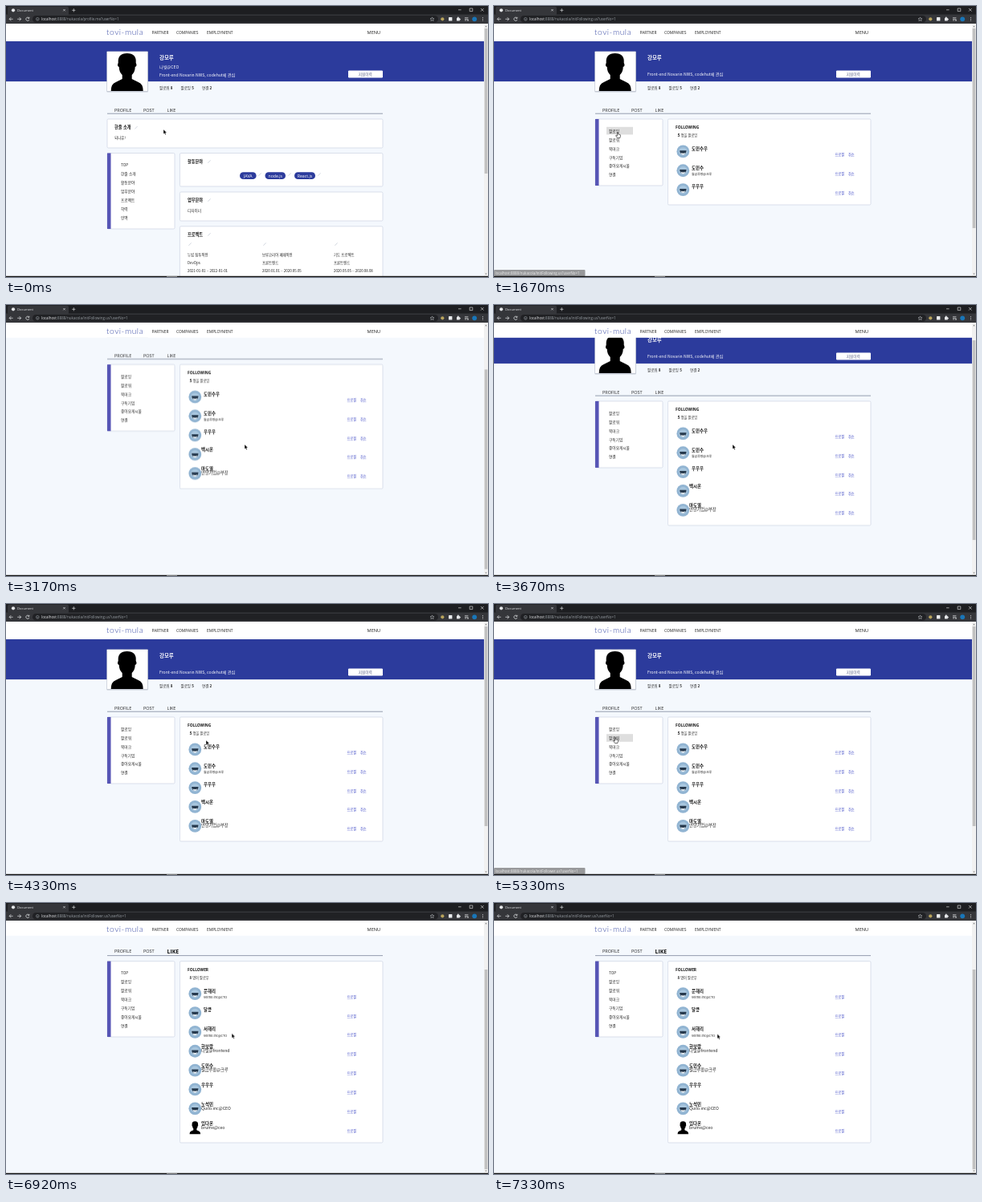
Write an HTML page that moves like this. It is 600 px wide and 338 px high and loops after 8 s.

```html
<!DOCTYPE html>
<html lang="ko">
<head>
<meta charset="utf-8">
<title>Document</title>
<style>
html, body { margin: 0; width: 100%; height: 100%; overflow: hidden; background: #f4f8fd; }
svg { display: block; width: 600px; height: 338px; }
text { font-family: "Noto Sans CJK KR", "Noto Sans CJK", "Noto Sans", sans-serif; fill: #222; white-space: pre; }
.ui text { font-family: "Open Sans", "Noto Sans", sans-serif; }
text.b { font-weight: 700; fill: #111; }
.latin { font-family: "Open Sans", "Noto Sans", sans-serif !important; }
.card { fill: #fff; stroke: #ccd3e2; stroke-width: .7; }
.doc { animation: scroll 8s linear infinite; }
.thumb { animation: thumb 8s linear infinite; }
.cursor { animation: move 8s linear infinite; }

@keyframes scroll {
  0%, 31.25% { transform: translateY(0); }
  32.25% { transform: translateY(-1px); }
  35.4%, 39.2% { transform: translateY(-70px); }
  45.9% { transform: translateY(-21px); }
  47.9%, 77.2% { transform: translateY(0); }
  79.2% { transform: translateY(-57px); }
  82.3%, 100% { transform: translateY(-70px); }
}
@keyframes thumb {
  0%, 31.25% { transform: translateY(0); }
  32.25% { transform: translateY(.8px); }
  35.4%, 39.2% { transform: translateY(55px); }
  45.9% { transform: translateY(16px); }
  47.9%, 77.2% { transform: translateY(0); }
  79.2% { transform: translateY(45px); }
  82.3%, 100% { transform: translateY(55px); }
}
@keyframes move {
  0%, .9% { transform: translate(196px, 154px); }
  8.4%, 12% { transform: translate(207px, 129px); }
  18.8% { transform: translate(155px, 155px); }
  20.8%, 25.5% { transform: translate(154px, 157px); }
  28.5% { transform: translate(225px, 168px); }
  31.25%, 51.5% { transform: translate(297px, 174px); }
  54.1% { transform: translate(250px, 170px); }
  58%, 70.5% { transform: translate(151px, 166px); }
  75% { transform: translate(264px, 160px); }
  77.1%, 85% { transform: translate(282px, 162.5px); }
  91.6%, 100% { transform: translate(278px, 163.5px); }
}
</style>
</head>
<body>
<svg id="stage" viewBox="0 0 600 338" xmlns="http://www.w3.org/2000/svg"></svg>
<script>
const LOOP = 8000, BLUE = '#2c3b9c';
let css = '', count = 0;

// Text placed by its left edge and vertical middle
const txt = (x, y, s, size = 4.7, attr = '') =>
  `<text x="${x}" y="${y + size * .36}" font-size="${size}" ${attr}>${s}</text>`;
const bold = (x, y, s, size) => txt(x, y, s, size, 'class="b"');
const box = (x, y, w, h, fill, r = 0) =>
  `<rect x="${x}" y="${y}" width="${w}" height="${h}" rx="${r}" fill="${fill}"/>`;
const card = (x, y, r, b) =>
  `<rect class="card" x="${x}" y="${y}" width="${r - x}" height="${b - y}" rx="1.5"/>`;
const line = (d, color, w = .8) =>
  `<path d="${d}" fill="none" stroke="${color}" stroke-width="${w}"/>`;

// Shows content only in the given spans of the loop, in ms
function during(spans, body) {
  const name = 'show' + count++;
  const pct = t => +(t / LOOP * 100).toFixed(3);
  let frames = spans[0][0] > 0 ? '0%{opacity:0}' : '';
  for (const [a, b] of spans)
    frames += `${pct(a)}%{opacity:1}` + (b < LOOP ? `${pct(b)}%{opacity:0}` : '100%{opacity:1}');
  css += `@keyframes ${name}{${frames}}.${name}{opacity:0;animation:${name} 8s step-end infinite}`;
  return `<g class="${name}">${body}</g>`;
}

const bust = (x, y, k) => `<path transform="translate(${x} ${y}) scale(${k})" fill="#000"
  d="M-20 24Q-20 15-14 13L-6 9V4Q-10 0-10-6Q-13-7-11-11Q-12-23 0-23Q12-23 11-11Q13-7 10-6Q10 0 6 4V9L14 13Q20 15 20 24Z"/>`;

const face = y => `<g transform="translate(235.3 ${y})"><circle r="7.9" fill="#91b4d2"/>
  <ellipse rx="5.4" ry="5" fill="#a8c6de"/><path d="M-4.2-1.2H4.2Q4 3.4 0 3.4T-4.2-1.2Z" fill="#26394d"/>
  <path d="M-2.8 1.5Q0 3 2.8 1.5Q2 4 0 4T-2.8 1.5Z" fill="#eef3f7"/></g>`;

function tabs(active) {
  const y = active ? 135.6 : 134.2;
  return txt(135, 130.4, 'PROFILE', 5.5, 'class="latin"') + txt(171, 130.4, 'POST', 5.5, 'class="latin"') +
    (active ? txt(200.6, 131, 'LIKE', 6.8, 'class="b latin"') : txt(200.6, 130.4, 'LIKE', 5.5, 'class="latin"')) +
    line(`M126 ${y}H469`, '#8b93a8', .9);
}

const sidebar = (top, bottom, items, hover = '') =>
  card(126, top, 210, bottom) + box(126, top, 4.5, bottom - top, '#5655b5') + hover +
  items.map((s, i) => txt(143, top + 15.2 + i * 10.9, s)).join('');

const hoverAt = y => box(140, y - 4.8, 33, 9.6, '#dedede');

// One person: wide rows put the name further left and larger notes
function person(y, [name, note = '', kind = ''], cancel) {
  const wide = kind.includes('w'), x = wide ? 243 : 246;
  return (kind.includes('p') ? bust(235.3, y, .34) : face(y)) +
    bold(x, y - (wide ? 5.4 : 3.6), name, 5.4) +
    txt(x, y + (wide ? -.5 : 4.2), note, wide ? 5.2 : 3.9) +
    txt(424.5, y + 4, '프로필', 4.2, 'style="fill:#3b46c4"') +
    (cancel ? txt(441, y + 4, '취소', 4.2, 'style="fill:#3b46c4"') : '');
}
const people = (list, top, from, cancel) =>
  list.map((p, i) => person(top + (i + from) * 23.85, p, cancel)).join('');

const pencil = (x, y) => line(`M${x - 1.6} ${y + 1.8}L${x + 1.6} ${y - 1.6}`, '#d3d8e0', 1);
const title = (x, y, s) => bold(x, y, s, 5.2) + pencil(x + 27, y);
const pill = (x, w, s) => box(x, 207.3, w, 8.8, BLUE, 4.4) +
  txt(x + w / 2, 211.7, s, 5.2, 'text-anchor="middle" class="latin" style="fill:#fff"');
const project = (x, rows) => pencil(x + 3, 297) +
  rows.map((s, i) => txt(x, 310 + i * 10.4, s, 4.4)).join('');

const white = 'style="fill:#fff"';
const hero = box(0, 22, 600, 22, '#fff') + box(0, 44, 600, 50, BLUE) +
  box(0, 94, 600, .8, '#dbe2ee') +
  box(125.3, 56.6, 51.6, 51, '#c4c9d4', 1) + box(126, 57, 50, 49, '#fff') + bust(150.7, 82, 1) +
  txt(191, 65, '강모루', 6.4, 'font-weight="700" style="fill:#fff"') +
  box(426, 80.4, 43, 9, '#fff', 1.2) + txt(438.8, 85, '지원이력', 4.6, 'style="fill:#5d6488"') +
  [['팔로워', 8, 191], ['팔로잉', 5, 217.5], ['연결', 2, 244]].map(([s, n, x]) =>
    txt(x, 102, `${s} <tspan font-weight="700">${n}</tspan>`, 4.5)).join('');
const about = y => txt(191, y, 'Front-end Novarin NWS, codehut에 관심', 5.1, white);

const profile = txt(191, 75.8, '나빛@CEO', 5.1, white) + about(86) + tabs(false) +
  card(126, 141, 469, 177) + title(135, 151.6, '한줄 소개') + txt(135, 164.4, '되나유!', 4.5) +
  sidebar(183.5, 278, ['TOP', '한줄 소개', '활동분야', '업무분야', '프로젝트', '학력', '인맥']) +
  card(216.4, 183.5, 469, 225) + title(226, 194, '활동분야') +
  pill(291, 20.6, 'JAVA') + pill(322.5, 25.5, 'node.js') + pill(359, 26, 'React.js') +
  [316, 353, 390].map(x => pencil(x, 210)).join('') +
  card(216.4, 232, 469, 268) + title(226, 242, '업무분야') + txt(226, 255.4, '디자이너', 4.6) +
  card(216.4, 274.8, 469, 350) + title(226, 284.8, '프로젝트') +
  project(226, ['누빔 침투작전', 'DevOps', '2021-01-01 ~ 2022-01-01']) +
  project(319, ['보루코리아 폐쇄작전', '프론트엔드', '2020.01.01 ~ 2020.05.05']) +
  project(408, ['기도 프로젝트', '프론트엔드', '2020.05.05 ~ 2020.08.08']);

const menu = ['팔로잉', '팔로워', '북마크', '구독기업', '좋아요게시물', '연결'];

const following = about(85) + tabs(false) +
  sidebar(141, 224, menu, during([[1480, 2150]], hoverAt(155.6)) + during([[4560, 5600]], hoverAt(167))) +
  during([[0, 2720]], card(216.4, 141, 469, 248)) +
  during([[2720, LOOP]], card(216.4, 141, 469, 296) +
    people([['백시온', '', 'w'], ['마도열', '안냥기업@부장', 'w']], 181.4, 3, true)) +
  txt(226, 151.6, 'FOLLOWING', 4.8, 'class="b latin"') +
  txt(228.5, 161.6, '<tspan font-weight="700" font-size="5.2">5</tspan> 명을 팔로잉', 4.2) +
  people([['도민수우'], ['도민수', '월급루팡@크루'], ['우우우']], 181.4, 0, true);

const follower = about(85) + tabs(true) +
  sidebar(142.6, 237, ['TOP', ...menu]) +
  during([[0, 6360]], card(216.4, 142.6, 469, 250)) +
  during([[6360, LOOP]], card(216.4, 142.6, 469, 369) +
    people([['한보람', '나빛@frontend', 'w'], ['도민수', '월급루팡@크루', 'w'], ['우우우', '', 'w'],
      ['노석민', 'Quilo.inc@CEO', 'w'], ['임다온', 'brume@ceo', 'wp']], 183.2, 3)) +
  txt(226, 153, 'FOLLOWER', 4.8, 'class="b latin"') +
  txt(228.5, 163.2, '<tspan font-weight="700">8</tspan> 명이 팔로우', 4.2) +
  people([['문해리', 'Velmo.inc@CTO'], ['달콩'], ['서해리', 'Velmo.inc@CTO']], 183.2, 0);

const FIRST = [[0, 890]], SECOND = [[890, 5600]], THIRD = [[5600, LOOP]];

const header = box(0, 22, 600, 18.8, '#fff') +
  txt(125, 32.6, 'tovi-mula', 10.2, 'font-weight="300" style="font-family:Lato,sans-serif;fill:#3c4da6;letter-spacing:.55px"') +
  txt(181.5, 33.2, 'PARTNER', 4.9) + txt(212, 33.2, 'COMPANIES', 4.9) +
  txt(250, 33.2, 'EMPLOYMENT', 4.9) + txt(449.5, 33, 'MENU', 5.7);

const scrollbar = box(595, 22, 5, 315, '#f1f1f1') +
  '<path d="M596.4 26.2L597.5 24.6L598.6 26.2ZM596.4 333.4L597.5 335L598.6 333.4Z" fill="#777"/>' +
  during(FIRST, box(595.7, 28, 3.7, 181, '#c1c1c1')) +
  during([[890, LOOP]], `<g class="thumb">${box(595.7, 28, 3.7, 249, '#c1c1c1')}</g>`);

const url = page => txt(44, 16.3, `localhost<tspan fill="#9aa0a6">:8888/nukacola/${page}?userNo=1</tspan>`, 4.5, 'style="fill:#e8eaed"');
const status = page => box(0, 329, 113.5, 8, '#98999b', 1) +
  txt(1.5, 333, `localhost:8888/nukacola/${page}?userNo=1`, 4.4, 'style="fill:#ededed"');
const dot = (x, y, r, c) => `<circle cx="${x}" cy="${y}" r="${r}" fill="${c}"/>`;
const GREY = '#d5d7da';

const browser = box(0, 0, 600, 11, '#1d1e21') + box(2, .8, 76, 11, '#35363a', 2) +
  box(0, 10.5, 600, 11.5, '#35363a') + box(33, 12, 505, 8.6, '#202124', 4.3) +
  dot(9, 5.3, 2.1, '#e4e6e8') + txt(14, 5.2, 'Document', 4.1, 'style="fill:#e8eaed"') +
  line('M71.3 4L73.7 6.4M73.7 4L71.3 6.4M82.2 5.3H86.4M84.3 3.2V7.4', GREY, .7) +
  line('M563 4.8H566.6M577.2 3H580.8V6.6H577.2ZM591 3L594.6 6.6M594.6 3L591 6.6', '#eee', .6) +
  line('M8.6 16.3H4.2M6.2 14.2L4.1 16.3L6.2 18.4M14.2 16.3H18.6M16.6 14.2L18.7 16.3L16.6 18.4', GREY) +
  line('M28.6 15A2.1 2.1 0 1 0 28.9 17M28.9 13.8V15.4H27.2', GREY) +
  `<circle cx="39.3" cy="16.3" r="1.8" fill="none" stroke="#9aa0a6" stroke-width=".6"/>` +
  line('M39.3 16V17.4', '#9aa0a6', .6) +
  '<path d="M530.5 13.9L531.2 15.6L533 15.7L531.6 16.9L532.1 18.7L530.5 17.7L528.9 18.7L529.4 16.9L528 15.7L529.8 15.6Z" fill="none" stroke="#c9ccd0" stroke-width=".5"/>' +
  dot(543.3, 16.3, 2.1, '#b9a45c') + box(551, 14, 4.4, 4.4, '#eceef0', .5) +
  box(561, 14.7, 3.8, 3.8, '#e6e8ea', .5) + dot(562.8, 14.5, .9, '#e6e8ea') + dot(565, 16.6, .9, '#e6e8ea') +
  line('M571 14.7H575.4M571 16.3H575.4M571 17.9H573.3', '#dcdee0', .7) + dot(575, 17.9, .8, '#dcdee0') +
  dot(583.2, 16.3, 2.9, '#1976b8') +
  [14.5, 16.3, 18.1].map(y => dot(593.5, y, .5, '#dcdee0')).join('') +
  during(FIRST, url('profile.me')) + during(SECOND, url('initFollowing.us')) + during(THIRD, url('initFollower.us'));

const arrow = '<path d="M0 0V5.6L1.3 4.5L2.2 6.4L3.2 5.9L2.3 4.1H4Z" fill="#000" stroke="#fff" stroke-width=".3"/>';
const hand = '<path d="M-.6 .7Q0-.4.6.7V3L3.1 3.5Q3.7 3.7 3.5 4.6L2.9 7.5H-.6L-2.4 4.8Q-2.3 3.9-1.5 4.4L-.6 5.1Z" fill="#fff" stroke="#111" stroke-width=".6"/>';

document.getElementById('stage').innerHTML =
  box(0, 0, 600, 338, '#f4f8fd') +
  `<g class="doc">${hero}${during(FIRST, profile)}${during(SECOND, following)}${during(THIRD, follower)}</g>` +
  `<g class="ui">${header}${scrollbar}${browser}` +
  during([[1640, 2300]], status('initFollowing.us')) +
  during([[4700, 6260]], status('initFollower.us')) + '</g>' +
  box(0, 336.8, 600, 1.2, '#111') + box(200, 337, 13, 1, '#777') +
  `<g class="cursor">${during([[0, 600], [1050, 1480], [2150, 4560], [5700, LOOP]], arrow)}` +
  during([[600, 1050], [1480, 2150], [4560, 5700]], hand) + '</g>';

const sheet = document.createElement('style');
sheet.textContent = css;
document.head.append(sheet);
</script>
</body>
</html>
```
